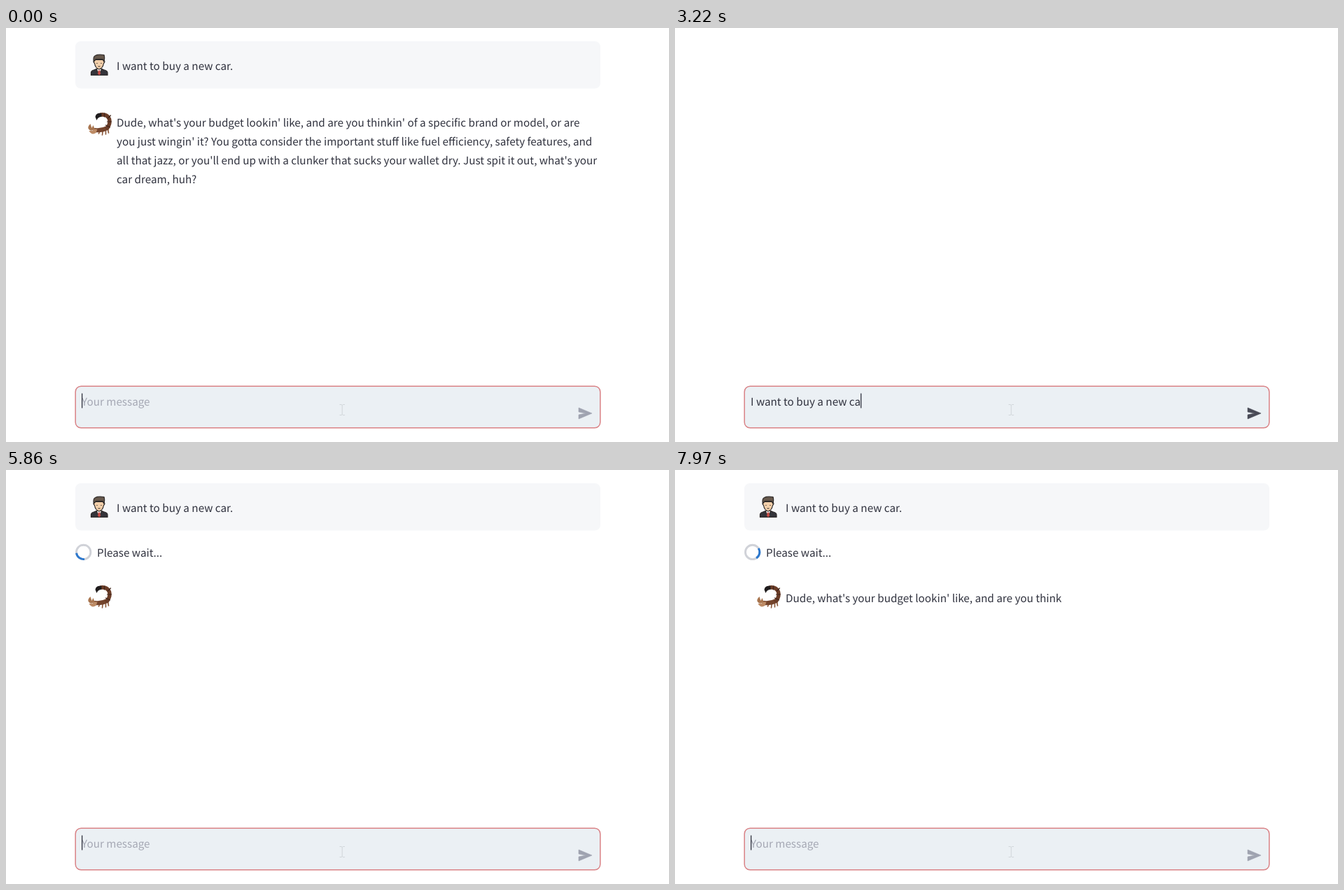
Write an HTML page that moves like this. It is 947 by 592 pixels and loops after 7.99 s.

```html
<!DOCTYPE html>
<html lang="en">
<head>
<meta charset="utf-8">
<title>Chat</title>
<style>
  html, body { margin: 0; width: 100%; height: 100%; overflow: hidden; background: #fff; }
  svg { display: block; width: 947px; height: 592px; }
  text {
    font: 15.27px "Noto Sans CJK JP", "Noto Sans CJK SC", "Noto Sans CJK KR", "Noto Sans", sans-serif;
    fill: #31333f; white-space: pre; text-rendering: geometricPrecision;
  }
  #hint { fill: #a5a8b4; }
</style>
</head>
<body>
<svg viewBox="0 0 947 592">
  <g id="question">
    <rect x="99" y="19" width="750" height="67.5" rx="8" fill="#f6f7f9"/>
    <g id="man" stroke="#2d2928" stroke-width="1.2" stroke-linejoin="round">
      <path d="M121.500 67.500V64q0-3 4-4l4-1.500h7l4 1.500q4.500 1 4.500 4v3.500z" fill="#34343a"/>
      <path d="M129 58.500l4 8 4-8z" fill="#f4f1ee"/>
      <path d="M132 60.500h2.200l1 5-2.100 2-2.100-2z" fill="#c54b45" stroke="none"/>
      <path d="M126 45.500q-2 3 .5 5 1 7 6.500 8.500 5.500-1.500 6.500-8.500 2.500-2 .5-5z" fill="#f2cfaa"/>
      <path d="M125.500 48q-1.500-7 2-8.500 3-2 12.500-1 1.500 4-.3 9.500l-1.700-3.500h-9.500z" fill="#66584c"/>
      <path d="M130 50v1m6-1v1m-4.500 4h3"/>
    </g>
    <text id="asked" x="158" y="59.500">I want to buy a new car.</text>
  </g>

  <g id="wait">
    <circle cx="110.700" cy="117.400" r="10.200" fill="none" stroke="#d0d2d8" stroke-width="2.900"/>
    <path id="arc" d="M117.900 110.200a10.200 10.200 0 0 1 0 14.400" fill="none" stroke="#2c78ce" stroke-width="2.900"/>
    <text x="130" y="123.500">Please wait...</text>
  </g>

  <g id="scorpion" fill="none" stroke-linecap="round" stroke-linejoin="round">
    <path d="M18 25l-2 5m6-5l-1 7m5-7l0 6m3-8l1 6" stroke="#8a5638" stroke-width="1.600"/>
    <path d="M11 25q9 1 17-3" stroke="#75452d" stroke-width="6"/>
    <path d="M28 22q5-6 3-13-3-7-12-6" stroke="#6b3d28" stroke-width="5.500"/>
    <path d="M26 18l6 3m-4-8l6 0m-5-5l4-4m-9 2l0-5" stroke="#3e241b" stroke-width="1.200"/>
    <path d="M20 1q-8-1-9 5l2 5q2-5 7-5z" fill="#1f1c1d"/>
    <path d="M4 16q-6 6-1 9 4 2 7-2l-2-5-2 4z" fill="#a8754f"/>
    <path d="M2 26q4 7 10 3l2-5q-5-2-7 2z" fill="#bd8b65"/>
  </g>
  <g id="answer"></g>

  <rect x="99.200" y="512.200" width="749.600" height="59.600" rx="8" fill="#ebf0f4" stroke="#d98286" stroke-width="1.500"/>
  <path d="M476.500 538.500h2.500l1.200 1 1.200-1h2.500M476.500 553.500h2.500l1.200-1 1.200 1h2.500M480.200 539.500v13" fill="none" stroke="#d0d5d9"/>
  <path id="send" d="M818 543l19 8-19 8v-6l10-2-10-2z" stroke-width=".6" stroke-linejoin="round"/>
  <text id="hint" x="108" y="539.500">Your message</text>
  <text id="typed" x="108" y="539.500"></text>
  <rect id="caret" y="522.500" width="1.300" height="21" fill="#31333f"/>
</svg>
<script>
const LOOP = 7990, CLEARED = 20, SENT = 3650, POSTED = 3880;
const $ = id => document.getElementById(id);
const show = (id, on) => $(id).setAttribute('visibility', on ? 'visible' : 'hidden');
const set = (id, name, value) => $(id).setAttribute(name, value);

const question = $('asked').textContent;
const reply = [
  "Dude, what's your budget lookin' like, and are you thinkin' of a specific brand or model, or are",
  "you just wingin' it? You gotta consider the important stuff like fuel efficiency, safety features, and",
  "all that jazz, or you'll end up with a clunker that sucks your wallet dry. Just spit it out, what's your",
  "car dream, huh?"
];
const lines = reply.map((_, i) => {
  const line = document.createElementNS('http://www.w3.org/2000/svg', 'text');
  line.setAttribute('x', 158);
  return $('answer').appendChild(line);
});

// One time per typed letter
const keyTimes = [400, 720, 720, 780, 840, 980, 1000, 1240, 1310, 1520, 1680, 1980,
  2120, 2260, 2400, 2500, 2660, 2710, 2770, 2820, 3150, 3220, 3360, 3550];
const caretGaps = [[160, 400], [560, 720], [1840, 1980], [2500, 2660], [4100, 4710]];
const stream = [[7380, 'Dude,'], [7480, "what's"], [7590, 'your'], [7730, "lookin'"],
  [7810, 'like,'], [7890, 'are'], [7970, 'think']];
// Time and angle of the spinner
const turns = [[3880, -45], [4180, 92], [5860, 847], [7130, 1567], [7970, 2172], [LOOP, 2181]];

function spinnerAngle(t) {
  const i = Math.max(1, turns.findIndex(([time]) => time >= t));
  const [t0, a0] = turns[i - 1], [t1, a1] = turns[i];
  return a0 + (a1 - a0) * (t - t0) / (t1 - t0);
}

function streamed(t) {
  const word = stream.filter(([time]) => time <= t).pop()?.[1];
  return word ? reply[0].slice(0, reply[0].indexOf(word) + word.length) : '';
}

function draw(t) {
  const done = t < CLEARED, posted = t >= POSTED;
  const count = t < SENT ? keyTimes.filter(k => k <= t).length : 0;

  show('question', done || posted);
  show('wait', t >= 3930);
  show('scorpion', done || t >= 4030);
  set('scorpion', 'transform', `translate(116.500 ${done ? 121 : 165})`);
  set('arc', 'transform', `rotate(${spinnerAngle(t)} 110.700 117.400)`);

  lines.forEach((line, i) => {
    line.textContent = done ? reply[i] : i ? '' : streamed(t);
    line.setAttribute('y', (done ? 140.5 : 188.5) + i * 27.3);
  });

  show('hint', !count);
  $('typed').textContent = question.slice(0, count);
  const color = count ? '#484a56' : '#9fa3b0';
  set('send', 'fill', color);
  set('send', 'stroke', color);
  set('caret', 'x', 108 + (count ? $('asked').getSubStringLength(0, count) : 0));
  show('caret', !caretGaps.some(([from, to]) => t >= from && t < to));
}

const start = performance.now();
function tick() {
  draw((performance.now() - start) % LOOP);
  requestAnimationFrame(tick);
}
tick();
</script>
</body>
</html>
```
